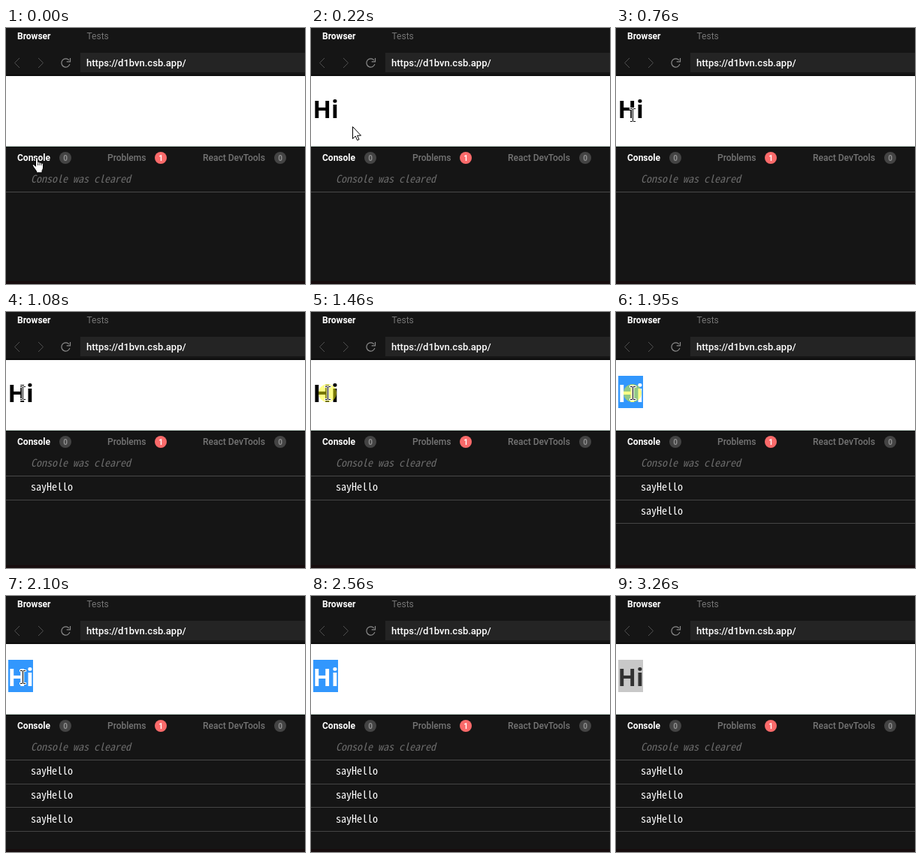
Write an HTML page with a canvas that moves like this. It is 398x341 px and loops after 3.34 s.

```html
<!DOCTYPE html>
<html lang="en">
<head>
<meta charset="utf-8">
<title>Console clicks</title>
<style>
  html, body { margin: 0; width: 100%; height: 100%; overflow: hidden; background: #151515; }
  canvas { display: block; }
</style>
</head>
<body>
<canvas id="stage" width="398" height="341"></canvas>
<script>
const ctx = document.getElementById('stage').getContext('2d');
const LOOP = 3340;
const UI = 'Roboto, sans-serif';
const MONO = '"Noto Sans Mono CJK KR", "Noto Sans Mono CJK JP", "Liberation Mono", monospace';

// Console font size that gives a 7 px character cell
ctx.font = `100px ${MONO}`;
const monoSize = 700 / ctx.measureText('0').width;

const HAND = new Path2D('M5.5 1.5C5.5 .3 8.5 .3 8.5 1.5V7C8.5 6 10.9 6.2 10.9 7.5C10.9 6.8 13.2 7 13.2 8.3' +
  'C13.2 7.6 15.5 8 15.5 9.4V14C15.5 16 14 17 14 18.5V20.8H6.5V18.8C5 16.5 2.5 13.5 1.6 11.6' +
  'C.8 10 2.6 9.2 3.8 10.5L5.5 12.3Z');
const ARROW = new Path2D('M.5 .5V16.5L4.2 13L6.6 18.5L9 17.5L6.6 12.2H11.5Z');

// Pointer keys: start time, shape, position
const POINTER = [
  [0, 'hand', 34, 172],
  [60, 'arrow', 47, 163],
  [140, 'arrow', 53, 145],
  [220, 'arrow', 55, 131],
  [370, 'arrow', 36, 121],
  [460, 'beam', 22, 120],
  [760, 'beam', 22, 116],
  [850, 'beam', 22, 111],
  [930, 'beam', 22, 108],
  [2420, 'arrow', 80, 145],
  [2490, 'arrow', 141, 181],
  [2560, 'none', 0, 0]
];
const CLICKS = [[930, 1080], [1460, 1630], [1950, 2100]];

function rect(x, y, w, h, color) {
  ctx.fillStyle = color;
  ctx.fillRect(x, y, w, h);
}

function text(str, x, y, font, color, align = 'left') {
  ctx.font = font;
  ctx.fillStyle = color;
  ctx.textAlign = align;
  ctx.fillText(str, x, y);
}

function disc(x, y, r, color) {
  ctx.fillStyle = color;
  ctx.beginPath();
  ctx.arc(x, y, r, 0, Math.PI * 2);
  ctx.fill();
}

function line(points, color, width = 1) {
  ctx.strokeStyle = color;
  ctx.lineWidth = width;
  ctx.beginPath();
  points.forEach(([x, y]) => ctx.lineTo(x, y));
  ctx.stroke();
}

function badge(x, label, fill, color) {
  disc(x, 173, 8, fill);
  text(label, x, 176.5, `bold 10px ${UI}`, color, 'center');
}

function reloadIcon(x, y) {
  ctx.strokeStyle = '#8a8a8a';
  ctx.lineWidth = 1.2;
  ctx.beginPath();
  ctx.arc(x, y, 5.6, 0.3, Math.PI * 1.78);
  ctx.stroke();
  line([[x + 6, y - 6.5], [x + 6, y - 1.7], [x + 1.2, y - 1.7]], '#8a8a8a', 1.2);
}

function drawBrowser() {
  rect(0, 0, 398, 341, '#151515');
  text('Browser', 15, 15, `bold 12px ${UI}`, '#fff');
  text('Tests', 107.5, 15, `12px ${UI}`, '#757575');
  line([[18, 40], [11.5, 46.5], [18, 53]], '#505050');
  line([[43, 40], [49.5, 46.5], [43, 53]], '#505050');
  reloadIcon(79.5, 46.5);
  rect(99, 33, 299, 26, '#242424');
  text('https://d1bvn.csb.app/', 107, 51, `500 13px ${UI}`, '#fff');
  rect(0, 62, 398, 2, '#0d0d0d');
  rect(0, 64, 398, 93, '#fff');
  rect(0, 157, 398, 1, '#c5d8cd');
}

function drawConsole(logs) {
  text('Console', 15, 177, `bold 12px ${UI}`, '#fff');
  text('Problems', 135, 177, `500 12px ${UI}`, '#757575');
  text('React DevTools', 262, 177, `500 12px ${UI}`, '#757575');
  badge(79, '0', '#444', '#909090');
  badge(206, '1', '#fa6a6a', '#fff');
  badge(365, '0', '#444', '#909090');
  text('Console was cleared', 33, 206, `italic ${monoSize}px ${MONO}`, '#6c6c6c');
  rect(0, 218, 398, 1, '#484848');
  for (let i = 0; i < logs; i++) {
    text('sayHello', 33, 238 + i * 32, `${monoSize}px ${MONO}`, '#fff');
    rect(0, Math.floor(250 + i * 31.5), 398, 1, '#444');
  }
  rect(0, 337, 398, 4, '#170d0e');
}

function drawHeading(t) {
  if (t < 60) return;
  let color = '#000';
  if (t >= 1950) {
    const blurred = t >= 3260;
    rect(3, 85, 33, 43, blurred ? '#c8c8c8' : '#3297fd');
    color = blurred ? '#323232' : '#fff';
  }
  text('Hi', 2.6, 120, 'bold 32px "Open Sans", "Noto Sans", sans-serif', color);
}

function beam(x, y) {
  const parts = [[-3, -9, 3, 1], [1, -9, 3, 1], [0, -8, 1, 16], [-3, 8, 3, 1], [1, 8, 3, 1]];
  for (const [dx, dy, w, h] of parts) rect(x + dx - 1, y + dy - 1, w + 2, h + 2, '#fff');
  for (const [dx, dy, w, h] of parts) rect(x + dx, y + dy, w, h, '#000');
}

function shape(path, x, y) {
  ctx.save();
  ctx.translate(x, y);
  ctx.fillStyle = '#fff';
  ctx.fill(path);
  ctx.strokeStyle = '#000';
  ctx.lineWidth = 1;
  ctx.stroke(path);
  if (path === HAND) {
    for (const fx of [8.5, 10.9, 13.2]) line([[fx, 7.5], [fx, 11]], '#000', 0.8);
  }
  ctx.restore();
}

function drawPointer(t) {
  const [, kind, x, y] = POINTER.findLast(key => key[0] <= t);
  if (CLICKS.some(([from, to]) => t >= from && t < to)) disc(x, y, 12, 'rgba(255, 255, 0, 0.47)');
  if (kind === 'beam') beam(x, y);
  if (kind === 'hand') shape(HAND, x, y);
  if (kind === 'arrow') shape(ARROW, x, y);
}

function draw(now) {
  const t = Math.max(0, now) % LOOP;
  drawBrowser();
  drawHeading(t);
  drawConsole(CLICKS.filter(click => t >= click[1]).length);
  drawPointer(t);
}

const start = performance.now();
function tick() {
  draw(performance.now() - start);
  requestAnimationFrame(tick);
}
tick();
</script>
</body>
</html>
```
